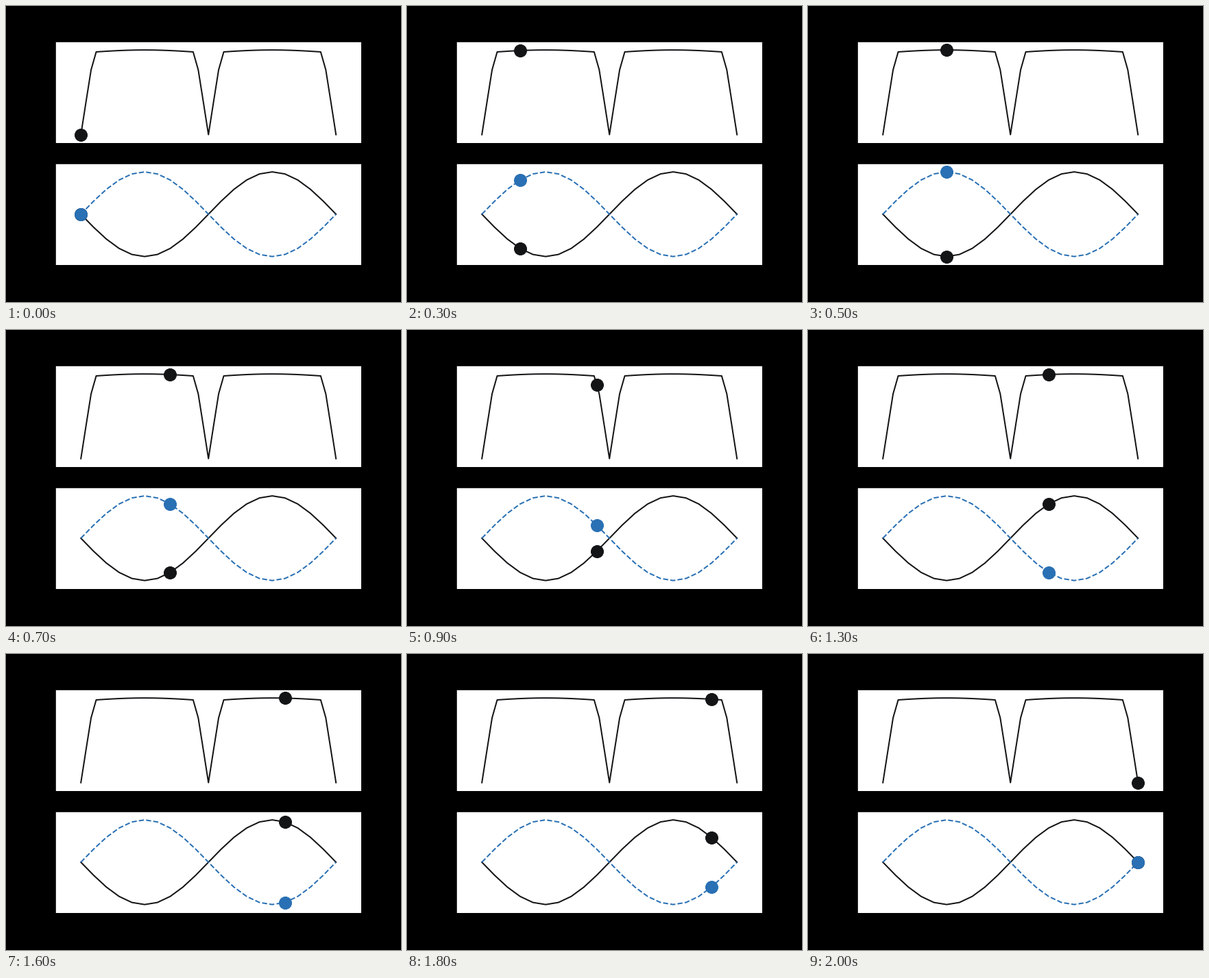
Animation, 576 px wide and 432 px high, one loop 2.1 s. Source, as a matplotlib script:

```python
import numpy as np
import matplotlib.pyplot as plt
from matplotlib.animation import FuncAnimation

INK, BLUE = "#131416", "#2970b4"
STEPS = 21
KNEE = 0.036  # slope of the nearly flat part


def response(x):
    """Rises steeply with |sin|, then flattens out past the knee."""
    s = np.abs(np.sin(np.pi * x))
    return np.minimum(3.08 * s, 1 - KNEE * (1 - s))


def dot(ax, color):
    return ax.plot([], [], "o", color=color, ms=18, mew=1, zorder=3)[0]


fig, (top, low) = plt.subplots(2, 1, figsize=(8, 6), dpi=72, facecolor="black")
fig.subplots_adjust(left=0.125, right=0.9, bottom=0.125, top=0.88, hspace=0.2)

for ax in (top, low):
    ax.set(xlim=(-0.2, 2.2), xticks=[], yticks=[])
top.set_ylim(-0.1, 1.1)
low.set_ylim(-1.2, 1.2)

fine = np.linspace(0, 2, 51)
level = response(fine)
t = np.linspace(0, 2, STEPS)
wave = np.sin(np.pi * t)

top.plot(fine, level, color=INK, lw=2)
low.plot(t, -wave, color=INK, lw=2)
low.plot(t, wave, "--", color=BLUE, lw=2)

dots = [dot(top, INK), dot(low, INK), dot(low, BLUE)]


def update(i):
    heights = np.interp(t[i], fine, level), -wave[i], wave[i]
    for d, y in zip(dots, heights):
        d.set_data([t[i]], [y])
    return dots


anim = FuncAnimation(fig, update, frames=STEPS, interval=100,
                     init_func=lambda: update(0), repeat=True, repeat_delay=0)
plt.show()
```
